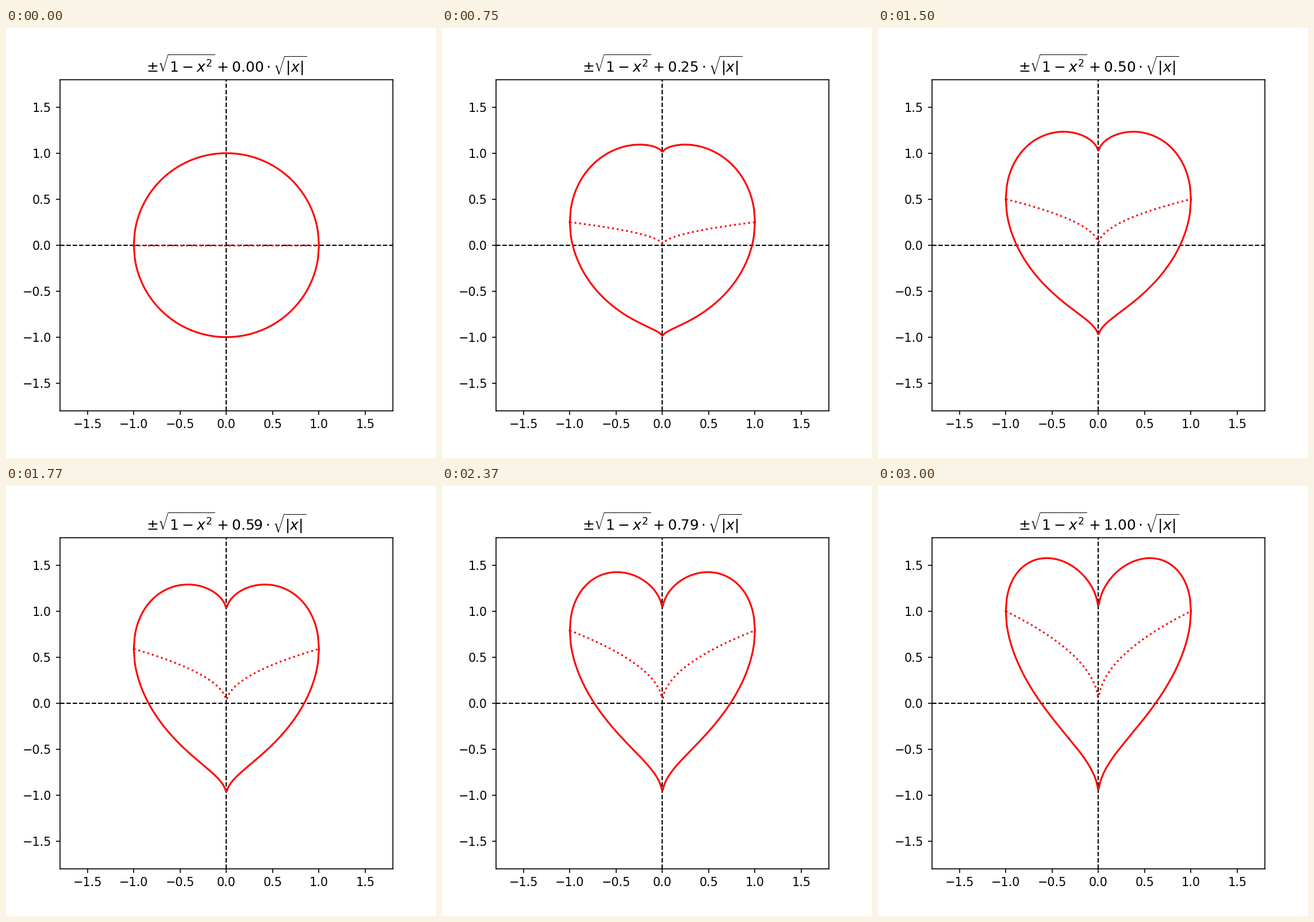
Animation, 748 px wide and 748 px high, one loop 6.3 s. Source, as a matplotlib script:

```python
import numpy as np
import matplotlib.pyplot as plt
from matplotlib.animation import FuncAnimation

INTERVAL = 30       # ms per step
GROW_STEPS = 100    # the coefficient rises from 0 to 1, then holds
TOTAL_STEPS = 210

x = np.linspace(-1, 1, 200)
arc = np.sqrt(1 - x**2)
cusp = np.sqrt(np.abs(x))

fig, ax = plt.subplots(figsize=(5, 5), dpi=149.6)
ax.set_xlim(-1.8, 1.8)
ax.set_ylim(-1.8, 1.8)
ax.set_xticks(np.arange(-1.5, 1.6, 0.5))
ax.set_yticks(np.arange(-1.5, 1.6, 0.5))

ax.axhline(0, color="black", linestyle="--", linewidth=1)
ax.axvline(0, color="black", linestyle="--", linewidth=1)
upper, = ax.plot(x, arc, color="red")
lower, = ax.plot(x, -arc, color="red")
middle, = ax.plot(x, 0 * x, color="red", linestyle=":")
title = ax.set_title("")


def update(step):
    a = min(step, GROW_STEPS) / GROW_STEPS
    shift = a * cusp
    upper.set_ydata(shift + arc)
    lower.set_ydata(shift - arc)
    middle.set_ydata(shift)
    title.set_text(rf"$\pm\sqrt{{1-x^2}}+{a:.2f}\cdot\sqrt{{|x|}}$")
    return upper, lower, middle, title


anim = FuncAnimation(fig, update, frames=TOTAL_STEPS, interval=INTERVAL,
                     repeat=True, repeat_delay=0)
plt.show()
```
